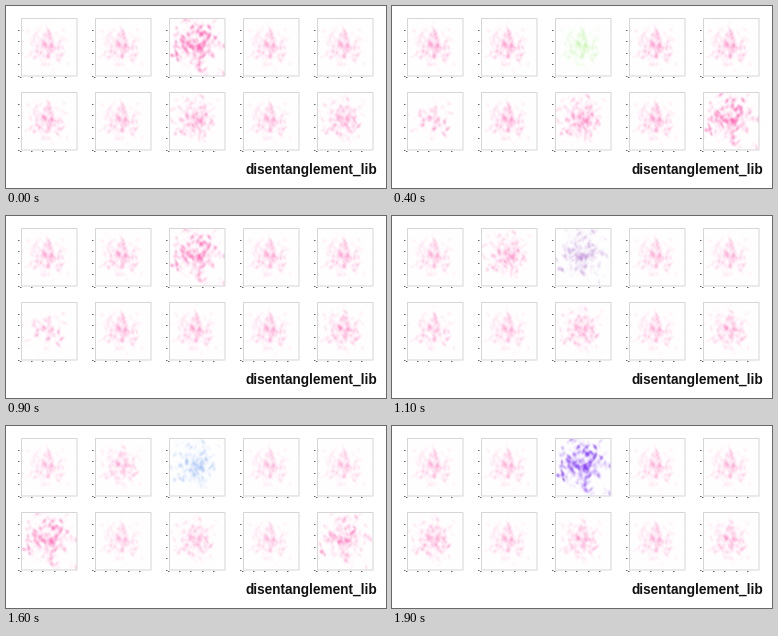
A matplotlib script for the animation above (2 s loop, 380 by 182 pixels).

```python
import numpy as np
import matplotlib.pyplot as plt
from matplotlib.animation import FuncAnimation
from matplotlib.patches import Rectangle

W, H, DPI = 380, 182, 100
FRAMES, INTERVAL = 20, 100
PW, PH, PITCH = 56, 58, 74
LEFT, TOP = 15, 12

PINK, GREEN = (255, 92, 176), (170, 240, 135)
BLUE, PURPLE = (100, 150, 240), (125, 50, 245)
HUE_TIMES = (0, 2, 6, 9, 13, 16, 19)
HUES = (PINK, GREEN, GREEN, PINK, BLUE, BLUE, PURPLE)

# panel: (peak time, strength) of each burst
BURSTS = {
    1: [(13, 0.8)],
    2: [(9, 1.0), (13, 0.4), (19, 2.0)],
    5: [(16, 1.3)],
    7: [(2, 0.8), (13.5, 0.8)],
    9: [(2, 0.5), (5.5, 1.1), (14.5, 1.2)],
}
HUE_PANEL, SPARSE_PANEL = 2, 5

rng = np.random.default_rng(7)
N = 200
SIGMA = np.array([10.5, 11.5])

home = rng.normal(0, 1, (N, 2)) * SIGMA
away = rng.normal(0, 1, (N, 2)) * SIGMA
falloff = np.exp(-np.sum((home / SIGMA) ** 2, axis=1) / 6)
amp = 0.04 + 0.5 * rng.random(N) ** 3
angle = rng.uniform(0.6, 2.6, N)
long_r = rng.uniform(1.2, 2.1, N)
short_r = rng.uniform(0.75, 1.2, N)
gx, gy = np.meshgrid(np.arange(PW) + 0.5, np.arange(PH) + 0.5)


def pulse(frame, peak, width):
    gap = (frame - peak + FRAMES / 2) % FRAMES - FRAMES / 2
    return np.exp(-(gap / width) ** 2 / 2)


def density(frame, bursts=(), sparse=0.0):
    energy = sum(s * pulse(frame, peak, 1.6) for peak, s in bursts)
    mix = min(energy, 1)
    base = 0.6 + 0.12 * np.cos(2 * np.pi * (frame - 5) / FRAMES)
    gain = base * (1 + 1.3 * energy + 1.2 * sparse)
    spread = (1 + 0.15 * mix) / np.hypot(1 - mix, mix)
    pos = (home * (1 - mix) + away * mix) * spread + (PW / 2 - 0.5, PH / 2)
    shown = np.clip(N * (1 - 0.88 * sparse) - np.arange(N), 0, 1)
    weight = gain * amp * shown * (falloff * (1 - mix) + mix)

    def col(a):
        return a[:, None, None]

    dx, dy = gx - col(pos[:, 0]), gy - col(pos[:, 1])
    c, s = col(np.cos(angle)), col(np.sin(angle))
    u = (dx * c + dy * s) / col(long_r)
    v = (dy * c - dx * s) / col(short_r)
    spots = np.exp(-(u * u + v * v) / 2)
    return 1 - np.exp(-np.einsum("i,ijk->jk", weight, spots))


def tint(alpha, color):
    return 1 - alpha[..., None] * (1 - np.asarray(color) / 255)


fig = plt.figure(figsize=(W / DPI, H / DPI), dpi=DPI, facecolor="white")
ax = fig.add_axes([0, 0, 1, 1])
ax.axis("off")


def mark(x, y):
    ax.add_patch(Rectangle((x, y), 1.5, 1, fc="#666666", lw=0, snap=False))


images = []
for i in range(10):
    x, y = LEFT + PITCH * (i % 5), TOP + PITCH * (i // 5)
    images.append(ax.imshow(np.ones((PH, PW, 3)), extent=(x, x + PW, y + PH, y),
                            aspect="auto", interpolation="nearest"))
    ax.add_patch(Rectangle((x + 0.5, y + 0.5), PW - 0.5, PH - 0.5, fill=False,
                           ec="#d6d6d6", lw=72 / DPI, snap=False))
    for k in range(5):
        mark(x - 3, round(y + PH - k * PH / 5))
        mark(round(x + k * PW / 5) - 1, y + PH + 1)

ax.text(239.5, 168, "disentanglement_lib", family="Liberation Sans",
        weight="bold", size=13.6 * 72 / DPI, color="#111111", va="baseline")
ax.set_xlim(0, W)
ax.set_ylim(H, 0)


def update(frame):
    still = tint(density(frame), PINK)
    hue = [np.interp(frame, HUE_TIMES, channel, period=FRAMES)
           for channel in zip(*HUES)]
    for i, im in enumerate(images):
        if i in BURSTS:
            sparse = pulse(frame, 6.5, 2.8) if i == SPARSE_PANEL else 0
            color = hue if i == HUE_PANEL else PINK
            im.set_data(tint(density(frame, BURSTS[i], sparse), color))
        else:
            im.set_data(still)
    return images


anim = FuncAnimation(fig, update, frames=FRAMES, interval=INTERVAL,
                     repeat=True, repeat_delay=0, blit=False)
plt.show()
```
